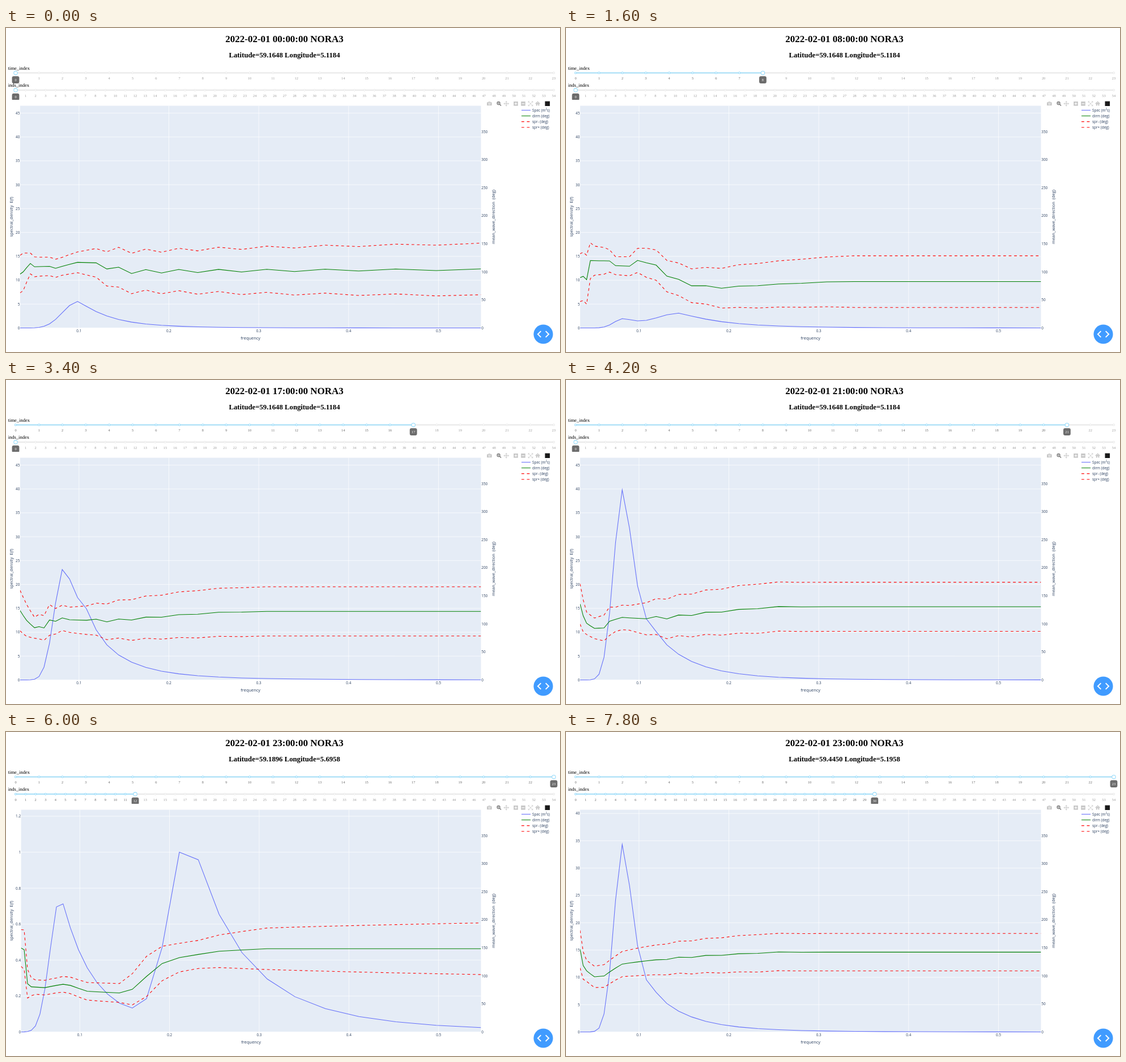
An HTML page with a canvas for the animation above (8000 ms loop, 978 px wide and 573 px high).

```html
<!DOCTYPE html>
<html lang="en">
<head>
<meta charset="utf-8">
<title>Wave spectrum</title>
<style>
html, body { margin: 0; width: 100%; height: 100%; overflow: hidden; background: #fff; }
canvas { display: block; width: 978px; height: 573px; }
</style>
</head>
<body>
<canvas id="stage"></canvas>
<script>
const W = 978, H = 573, STEP = 200, STEPS = 40;
const canvas = document.getElementById('stage');
const ctx = canvas.getContext('2d');
const dpr = window.devicePixelRatio || 1;
canvas.width = W * dpr;
canvas.height = H * dpr;

const SERIF = '"Liberation Serif", "Times New Roman", serif';
const SANS = '"Open Sans", sans-serif';
const INK = '#2a3f5f', SMALL = 6.38, STROKE = 1.06, DASH = [4.78, 4.78];
const TOP = 137.5, BASE = 530.5, RIGHT = 838.5, DEG_MAX = 396;

// Frequencies form a geometric series; curves are defined over its index.
const COUNT = 30;
const bins = Array.from({ length: COUNT }, (_, i) => i);
const freq = bins.map(i => 0.0345 * 1.1 ** i);

const mix = (a, b, t) => a + (b - a) * t;
const mixAll = (a, b, t) => a.map((v, i) => mix(v, b[i], t));

// Straight segments through [index, value] knots, flat after the last.
function through(knots, x) {
  const i = knots.findIndex(k => k[0] >= x);
  if (i < 0) return knots[knots.length - 1][1];
  if (i === 0) return knots[0][1];
  const [x0, y0] = knots[i - 1], [x1, y1] = knots[i];
  return mix(y0, y1, (x - x0) / (x1 - x0));
}

// One wave system: steep rise below the peak, fall with its own power above.
function system([peak, height, rise, fall, power = 1.75], x) {
  const d = x - peak;
  return height * Math.exp(-(d < 0 ? (-d / rise) ** 1.75 : (d / fall) ** power));
}

// Odd and even bins alternate, fading out towards the end index.
function zigzag([amp, end], x) {
  return x < 14 ? 0 : amp * Math.max(0, 1 - (x - 14) / (end - 14)) * (x % 2 ? 1 : -1);
}

function pose({ step, max, lat, lon, systems, dir, spread, zig = [0, 24] }) {
  return {
    step, max, lat, lon,
    spec: bins.map(x => systems.reduce((sum, s) => sum + system(s, x), 0) / max),
    dir: bins.map(x => through(dir, x) + zigzag(zig, x)),
    spread: bins.map(x => through(spread, x))
  };
}

const coast = { max: 46.54, lat: 59.1648, lon: 5.1184 };
const evening = {
  ...coast, step: 21, zig: [2.2, 23],
  systems: [[9, 38.5, 1.96, 2.05], [13, 8.6, 2.8, 3.6, 1.25]],
  dir: [[0, 135.5], [1, 114.3], [2, 101], [4, 92], [6, 92.7], [7, 104.6], [9, 111.5], [12, 109], [13, 113], [14, 111], [21, 130.4]],
  spread: [[0, 36], [1, 28.5], [2, 20], [4, 18.3], [7, 25.3], [8, 21.7], [10, 22], [14, 35.3], [20, 43.8]]
};
const poses = [
  {
    ...coast, step: 0, zig: [3.8, 36],
    systems: [[11, 5.55, 2.8, 3.6, 1.25]],
    dir: [[0, 96], [1, 100], [3, 115], [4, 109], [7, 109.8], [8, 106.3], [11, 117], [13, 116], [14, 109], [16, 100.5], [29, 104]],
    spread: [[0, 33.4], [1, 33.5], [3, 18.5], [5, 17], [9, 16], [11, 18.5], [13, 25.5], [15, 35.5], [18, 37], [29, 46]]
  },
  {
    ...coast, step: 8, zig: [1.6, 24],
    systems: [[9, 1.8, 1.9, 2.2], [15, 3.1, 3.2, 3.4, 1.25]],
    dir: [[0, 89.7], [1, 92], [2, 86], [3, 120], [7, 119.5], [8, 111], [10, 110], [11, 120.4], [13, 112], [14, 94], [16, 76.5], [18, 71.8], [23, 82], [24, 82.6]],
    spread: [[0, 42.5], [2, 43.5], [3, 31.8], [4, 26], [6, 23.8], [8, 16], [10, 17], [12, 26], [16, 30], [19, 38], [24, 46]]
  },
  {
    ...coast, step: 13, zig: [1.7, 24],
    systems: [[12, 17.05, 3.05, 2.43, 0.9]],
    dir: [[0, 111.8], [1, 115.3], [2, 111.3], [4, 94.2], [5, 97.7], [6, 92.7], [7, 109.3], [8, 101.2], [9, 109.8], [10, 104], [13, 103.8], [14, 100], [16, 100], [23, 113.8]],
    spread: [[0, 36], [2, 37], [4, 19], [5, 23], [6, 21], [7, 29.5], [8, 23.8], [12, 22], [16, 34.3], [22, 43.4], [23, 43.9]]
  },
  evening,
  { ...evening, step: 24 },
  {
    step: 26, max: 17.23, lat: 59.1105, lon: 5.3349,
    systems: [[9, 14.3, 2.3, 1.78], [13, 2.9, 2.8, 3.33, 1.25], [22, 0.28, 2, 2]],
    dir: [[0, 146.6], [1, 117.4], [2, 98], [4, 86.6], [6, 87.6], [7, 94.7], [9, 98.7], [11, 93], [13, 79.6], [16, 74.5], [18, 75], [19, 79.6], [20, 91.7], [21, 116.3], [22, 133.7], [23, 144.3], [26, 147.3]],
    spread: [[0, 36.5], [1, 34.5], [2, 19], [4, 15], [10, 16.5], [12, 24], [14, 26.8], [18, 30.4], [19, 33.3], [21, 43], [29, 46]]
  },
  {
    step: 30, max: 1.236, lat: 59.1896, lon: 5.6958,
    systems: [[8.6, 0.76, 2.4, 4.34, 1.15], [19.5, 1.1, 1.5, 2.6, 1.05]],
    dir: [[0, 149.6], [1, 146.6], [2, 86], [3, 80.5], [6, 79], [9, 85], [10, 83], [12, 72.5], [15, 69.5], [16, 76], [18, 122], [19, 132.5], [21, 143.8], [23, 148.3]],
    spread: [[0, 32.7], [1, 35.2], [3, 16], [4, 12.8], [8, 13.3], [11, 15.3], [15, 16.8], [16, 27.8], [17, 35.8], [19, 25.5], [20, 25], [23, 37], [29, 46]]
  },
  {
    step: 39, max: 40.68, lat: 59.4450, lon: 5.1958, zig: [1.3, 23],
    systems: [[9, 33.4, 1.85, 2], [13, 6.1, 2.8, 3.6, 1.25]],
    dir: [[0, 147.6], [1, 118.4], [2, 109], [4, 98.2], [6, 99.7], [9, 121], [14, 130.5], [21, 142.2]],
    spread: [[0, 33.5], [1, 24.5], [2, 18.8], [4, 19], [8, 21.5], [14, 27.5], [20, 33.3]]
  }
].map(pose);

function stateAt(step) {
  const i = Math.max(1, poses.findIndex(p => p.step >= step));
  const a = poses[i - 1], b = poses[i];
  const t = (step - a.step) / (b.step - a.step);
  return {
    max: a.max * (b.max / a.max) ** t,
    lat: mix(a.lat, b.lat, t), lon: mix(a.lon, b.lon, t),
    spec: mixAll(a.spec, b.spec, t),
    dir: mixAll(a.dir, b.dir, t),
    spread: mixAll(a.spread, b.spread, t)
  };
}

function text(str, x, y, size, { font = SANS, color = INK, align = 'left', bold = false } = {}) {
  ctx.font = `${bold ? 'bold ' : ''}${size}px ${font}`;
  ctx.fillStyle = color;
  ctx.textAlign = align;
  ctx.fillText(str, x, y);
}

function sideText(str, x, y) {
  ctx.save();
  ctx.translate(x, y);
  ctx.rotate(-Math.PI / 2);
  text(str, 0, 0, 7.44, { align: 'center' });
  ctx.restore();
}

function rect(x, y, w, h, color) {
  ctx.fillStyle = color;
  ctx.fillRect(x, y, w, h);
}

function line(points, color, width, dash = []) {
  ctx.beginPath();
  points.forEach(([x, y]) => ctx.lineTo(x, y));
  ctx.strokeStyle = color;
  ctx.lineWidth = width;
  ctx.setLineDash(dash);
  ctx.stroke();
  ctx.setLineDash([]);
}

function ring(x, y, r, width, color, fill = '#fff') {
  ctx.beginPath();
  ctx.arc(x, y, r, 0, 7);
  if (fill) { ctx.fillStyle = fill; ctx.fill(); }
  ctx.strokeStyle = color;
  ctx.lineWidth = width;
  ctx.stroke();
}

function clipped(x, y, w, h, paint) {
  ctx.save();
  ctx.beginPath();
  ctx.rect(x, y, w, h);
  ctx.clip();
  paint();
  ctx.restore();
}

function slider(label, y, last, value, tipTop, tipEnd) {
  const x0 = 17, x1 = 967, at = i => mix(x0, x1, i / last), hx = at(value);
  text(label, 3.7, y - 5.8, 8.5, { font: SERIF, color: '#000' });
  rect(x0, y - 1.06, x1 - x0, 2.12, '#e9e9e9');
  rect(x0, y - 1.06, hx - x0, 2.12, '#abe2fb');
  for (let i = 0; i <= last; i++) {
    const on = i <= value;
    ring(at(i), y, 1.6, STROKE, on ? '#96dbfa' : '#e9e9e9');
    text(i, at(i), y + 11.9, SMALL, { font: SERIF, color: on ? '#666' : '#999', align: 'center' });
  }
  ring(hx, y, 3.2, STROKE, '#96dbfa');
  clipped(0, 0, W, tipEnd, () => {
    ctx.beginPath();
    ctx.roundRect(hx - 6.4, tipTop, 12.8, 12.8, 3);
    ctx.fillStyle = '#6c6c6c';
    ctx.fill();
    text(value, hx, tipTop + 8.5, SMALL, { font: SERIF, color: '#fff', align: 'center' });
  });
}

function modebar() {
  const dim = '#c7c7c7', lit = '#7c7c7c', y = 133.8;
  // camera
  rect(849, 131.4, 8.6, 5.6, dim);
  rect(851.4, 130.3, 3.8, 1.5, dim);
  ring(853.3, 134.1, 1.5, 0.8, '#fff', dim);
  // zoom
  ring(869.5, 133, 2.5, 1.3, lit, null);
  line([[871.3, 134.8], [874, 137.5]], lit, 1.6);
  line([[868.2, 133], [870.8, 133]], lit, 0.8);
  line([[869.5, 131.7], [869.5, 134.3]], lit, 0.8);
  // pan
  line([[879, y], [887.4, y]], dim, 1);
  line([[883.2, y - 4.2], [883.2, y + 4.2]], dim, 1);
  for (const [dx, dy] of [[1, 0], [-1, 0], [0, 1], [0, -1]]) {
    const px = 883.2 + dx * 2.8, py = y + dy * 2.8;
    line([[px - dy * 1.5, py - dx * 1.5], [px + dx * 1.4, py + dy * 1.4], [px + dy * 1.5, py + dx * 1.5]], dim, 0.9);
  }
  // zoom in and out
  for (const x of [900, 913]) {
    rect(x - 3.8, 130, 7.6, 7.6, dim);
    line([[x - 2.3, y], [x + 2.3, y]], '#fff', 1.1);
  }
  line([[900, y - 2.3], [900, y + 2.3]], '#fff', 1.1);
  // autoscale
  line([[922.8, 130.6], [929.2, 137]], dim, 0.8);
  line([[922.8, 137], [929.2, 130.6]], dim, 0.8);
  for (const sx of [-1, 1]) for (const sy of [-1, 1])
    line([[926 + sx * 1.9, y + sy * 3.9], [926 + sx * 3.9, y + sy * 3.9], [926 + sx * 3.9, y + sy * 1.9]], dim, 0.9);
  // home
  line([[934.6, 134], [938.6, 130.4], [942.6, 134]], dim, 1.2);
  rect(935.8, 133.4, 2, 4, dim);
  rect(939.4, 133.4, 2, 4, dim);
  rect(936.5, 132.4, 4.2, 2.4, dim);
  // badge
  rect(951.5, 129.6, 8.6, 8.4, '#1a1a1a');
}

function legend() {
  const rows = [['', '#636efa'], ['dirm (deg)', '#008000'], ['spr- (deg)', '#f00', DASH], ['spr+ (deg)', '#f00', DASH]];
  rows.forEach(([name, color, dash], i) => {
    const y = 145.4 + i * 10.1;
    line([[910, y], [926, y]], color, STROKE, dash);
    text(name, 929, y + 2.3, SMALL);
  });
  let x = 929;
  for (const [part, size, dy] of [['Spec (m', SMALL, 0], ['2', SMALL * 0.7, -2.7], ['s)', SMALL, 0]]) {
    text(part, x, 147.7 + dy, size);
    x += ctx.measureText(part).width;
  }
}

function tickStep(max) {
  const rough = max / 10, unit = 10 ** Math.floor(Math.log10(rough));
  return unit * [1, 2, 5, 10].find(m => m * unit >= rough);
}

function chart(s) {
  const ticks = [], gap = tickStep(s.max);
  for (let i = 0; i * gap <= s.max; i++) ticks.push(+(i * gap).toFixed(3));
  ctx.font = `${SMALL}px ${SANS}`;
  const left = 17.6 + Math.max(...ticks.map(v => ctx.measureText(v).width));
  const px = f => mix(left, RIGHT, (f - freq[0]) / (freq[COUNT - 1] - freq[0]));
  const py = part => mix(BASE, TOP, part);

  rect(left, TOP, RIGHT - left, BASE - TOP, '#e5ecf6');
  for (let f = 1; f <= 5; f++) {
    const x = px(f / 10);
    line([[x, TOP], [x, BASE]], '#fff', 0.7);
    text(f / 10, x, 537.9, SMALL, { align: 'center' });
  }
  for (const v of ticks) {
    const y = py(v / s.max);
    line([[left, y], [RIGHT, y]], '#fff', v ? 0.7 : STROKE);
    text(v, left - 0.5, y + 2.4, SMALL, { align: 'right' });
  }
  for (let d = 0; d <= 350; d += 50) text(d, 839.3, py(d / DEG_MAX) + 2.4, SMALL);

  const curve = (values, color, dash) => line(values.map((v, i) => [px(freq[i]), py(v)]), color, STROKE, dash);
  const angle = sign => s.dir.map((d, i) => (d + sign * s.spread[i]) / DEG_MAX);
  clipped(left, TOP, RIGHT - left, BASE - TOP + 0.5, () => {
    curve(s.spec, '#636efa');
    curve(angle(0), '#008000');
    curve(angle(-1), '#f00', DASH);
    curve(angle(1), '#f00', DASH);
  });

  text('frequency', (left + RIGHT) / 2, 550.8, 7.44, { align: 'center' });
  sideText('spectral_density  E(f)', 12, 334);
  sideText('mean_wave_direction  (deg)', 863.4, 334);
}

function button() {
  const x = 948.5, y = 541.5;
  ctx.beginPath();
  ctx.arc(x, y, 17.1, 0, 7);
  ctx.fillStyle = '#409bff';
  ctx.fill();
  for (const s of [-1, 1])
    line([[x + s * 4.2, y - 5.4], [x + s * 9.6, y], [x + s * 4.2, y + 5.4]], '#fff', 2);
}

function draw(step) {
  const s = stateAt(step);
  const hour = Math.min(step, 23), place = Math.max(0, (step - 24) * 2);
  ctx.setTransform(dpr, 0, 0, dpr, 0, 0);
  rect(0, 0, W, H, '#fff');
  const head = { font: SERIF, color: '#000', align: 'center', bold: true };
  text(`2022-02-01 ${String(hour).padStart(2, '0')}:00:00 NORA3`, 491.5, 25.2, 16.98, head);
  text(`Latitude=${s.lat.toFixed(4)} Longitude=${s.lon.toFixed(4)}`, 491.5, 52.3, 12.74, head);
  slider('time_index', 79.4, 23, hour, 85.2, 110);
  slider('inds_index', 109.8, 54, place, 115.7, 127);
  chart(s);
  modebar();
  legend();
  button();
}

function tick() {
  draw(Math.floor(performance.now() / STEP) % STEPS);
  requestAnimationFrame(tick);
}
tick();
</script>
</body>
</html>
```
